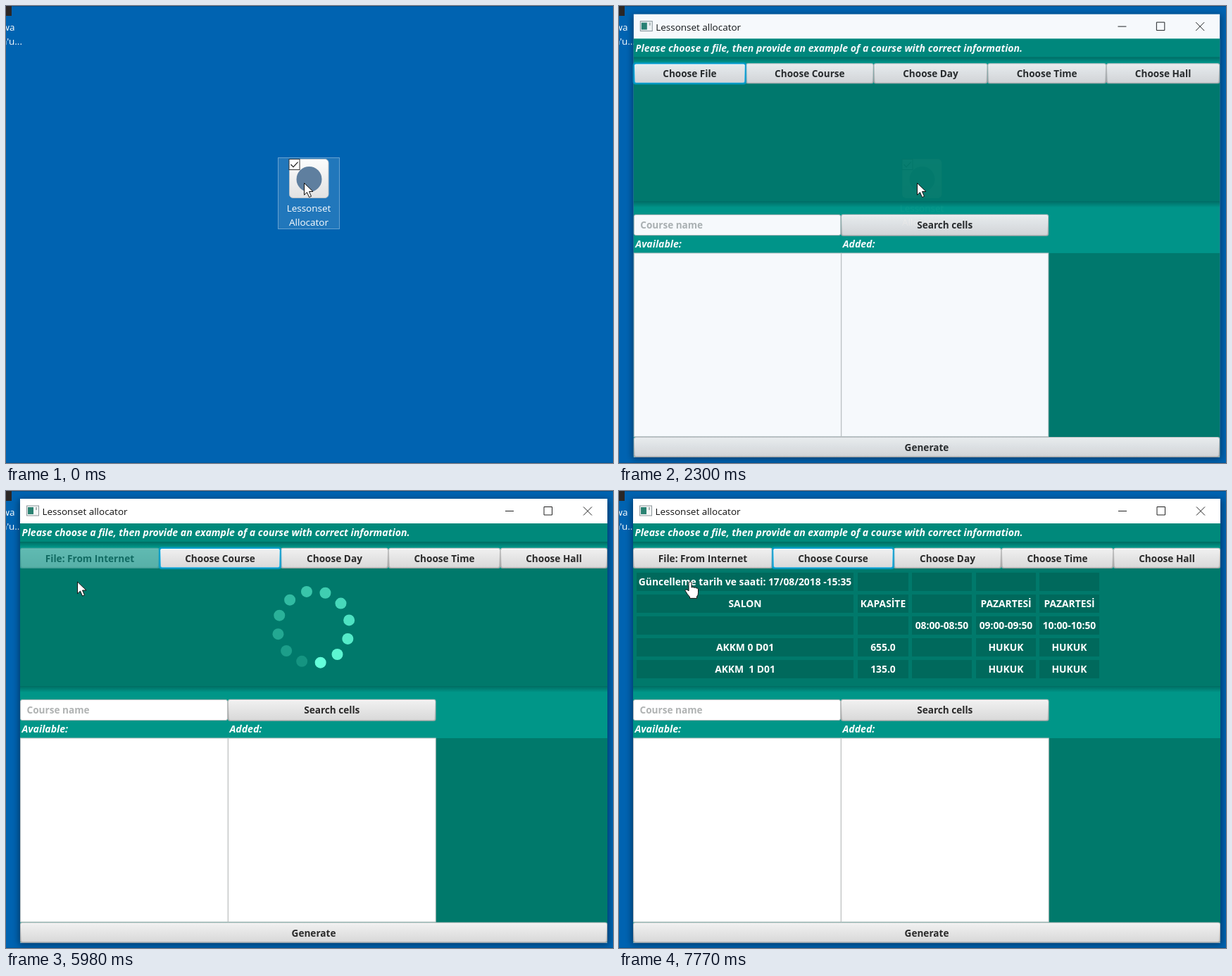
Recreate the animation shown at these times as an HTML page. Size 862 by 649 pixels, loop 8000 ms.

```html
<!DOCTYPE html>
<html lang="en">
<head>
<meta charset="utf-8">
<title>Lessonset allocator</title>
<style>
  html, body { margin: 0; width: 100%; height: 100%; overflow: hidden; background: #0063b1; }
  svg { display: block; width: 100%; height: 100%; }
  text { font: 13.5px "Open Sans", "Noto Sans", sans-serif; white-space: pre; }
  .b { font-weight: 700; font-size: 13.6px; }
  .i { font-style: italic; font-size: 14.1px; }
  .c { font-size: 13.85px; }
  .m { text-anchor: middle; }
</style>
</head>
<body>
<svg id="stage" viewBox="0 0 862 649" xmlns="http://www.w3.org/2000/svg">
  <defs>
    <linearGradient id="face" x2="0" y2="1"><stop stop-color="#f0f0f0"/><stop offset="1" stop-color="#d9d9d9"/></linearGradient>
    <linearGradient id="hover" x2="0" y2="1"><stop stop-color="#fcfcfc"/><stop offset="1" stop-color="#e4e4e4"/></linearGradient>
    <linearGradient id="press" x2="0" y2="1"><stop stop-color="#d4d4d4"/><stop offset="1" stop-color="#bdbdbd"/></linearGradient>
    <linearGradient id="edge" x2="0" y2="1"><stop stop-color="#c6c6c6"/><stop offset="1" stop-color="#a6a6a6"/></linearGradient>
    <linearGradient id="shine" x2="0" y2="1"><stop stop-color="#fff"/><stop offset="1" stop-color="#fff" stop-opacity=".25"/></linearGradient>
    <linearGradient id="tile" x2="0" y2="1"><stop stop-color="#fdfdfd"/><stop offset="1" stop-color="#e2e2e2"/></linearGradient>
    <linearGradient id="shade" x2="0" y2="1"><stop stop-opacity=".28"/><stop offset="1" stop-opacity="0"/></linearGradient>
    <filter id="blur" x="-5%" y="-5%" width="110%" height="110%"><feGaussianBlur stdDeviation="5"/></filter>
  </defs>
</svg>
<script>
const stage = document.getElementById('stage');
const LOOP = 8000;

function add(parent, tag, attrs = {}, label) {
  const el = document.createElementNS(stage.namespaceURI, tag);
  for (const k in attrs) el.setAttribute(k, attrs[k]);
  if (label !== undefined) el.textContent = label;
  parent.appendChild(el);
  return el;
}
const group = (parent, attrs) => add(parent, 'g', attrs);
const rect = (parent, x, y, width, height, fill, more) =>
  add(parent, 'rect', { x, y, width, height, fill, ...more });
const text = (parent, x, y, label, cls, fill) =>
  add(parent, 'text', { x, y, class: cls, fill }, label);
const show = (el, on) => el.setAttribute('display', on ? 'inline' : 'none');

function button(parent, x0, x1, y, h, label, focused) {
  const g = group(parent), w = x1 - x0;
  if (focused) rect(g, x0 - .2, y - .2, w + .4, h + .4, 'none', { rx: 3, stroke: '#039ed3', 'stroke-width': 2.4, opacity: .6 });
  rect(g, x0, y, w, h, focused ? '#039ed3' : 'url(#edge)', { rx: 3 });
  rect(g, x0 + 1.2, y + 1.2, w - 2.4, h - 2.4, 'url(#shine)', { rx: 2.2 });
  const face = rect(g, x0 + 2, y + 2, w - 4, h - 3.6, 'url(#face)', { rx: 1.8 });
  text(g, (x0 + x1) / 2, y + 20.3, label, 'b m', '#2a2a2a');
  return { g, face };
}

function toolbar(parent, edges, first, focus) {
  const g = group(parent);
  const labels = [first, 'Choose Course', 'Choose Day', 'Choose Time', 'Choose Hall'];
  const order = labels.map((_, i) => i).sort((a, b) => (a === focus) - (b === focus));
  const buttons = [];
  for (const i of order)
    buttons[i] = button(g, edges[i], edges[i + 1], 80.7, 29.2, labels[i], i === focus);
  return { g, file: buttons[0] };
}

// Desktop
rect(stage, 0, 0, 862, 649, '#0063b1');
rect(stage, 0, 0, 862, 1, '#004f8d');
rect(stage, 0, 648, 862, 1, '#00579c');
rect(stage, 0, 0, 8, 14, '#2b2726');
add(stage, 'text', { x: 12.5, y: 35, fill: '#fff', 'text-anchor': 'end' }, 'wa');
add(stage, 'text', { x: 23, y: 55, fill: '#fff', 'text-anchor': 'end' }, "a'u...");

const shortcut = group(stage);
const selection = rect(shortcut, 386.5, 215.5, 87, 101, '#fff', { 'fill-opacity': .13, stroke: '#fff', 'stroke-opacity': .36 });
rect(shortcut, 402.5, 217.5, 55.5, 55, 'url(#tile)', { rx: 5, stroke: '#b9bfc5' });
add(shortcut, 'circle', { cx: 430.5, cy: 246, r: 18, fill: '#5f7f9f' });
rect(shortcut, 402, 217.5, 15, 15, '#fff', { stroke: '#333' });
add(shortcut, 'path', { d: 'M404.5 225l3.5 3.6 6.5-7', fill: 'none', stroke: '#222', 'stroke-width': 1.3 });
text(shortcut, 430, 292, 'Lessonset', 'm', '#fff');
text(shortcut, 430, 312, 'Allocator', 'm', '#fff');

// Window frame
const win = group(stage);
rect(win, 18, 12, 838, 632, '#000', { opacity: .4, filter: 'url(#blur)' });
rect(win, 20, 11, 834, 630.5, '#fff');
rect(win, 29.5, 21, 17, 14, '#f4f6f6', { stroke: '#8b9599' });
rect(win, 31, 23, 8, 10, '#2b8272');
rect(win, 42, 23, 2, 4, '#a9b5b5');
text(win, 51.5, 34, 'Lessonset allocator', '', '#111');
add(win, 'path', { d: 'M709 28.5h12M764 22.5h11.5v11.5h-11.5zM820 22.5l12 12m0-12l-12 12', fill: 'none', stroke: '#222' });

// Window content
const body = group(win);
rect(body, 20, 46, 834, 595, '#009688');
rect(body, 20, 46, 834, 26, '#00897b');
rect(body, 20, 72, 834, 8, 'url(#shade)');
text(body, 22.5, 64, 'Please choose a file, then provide an example of a course with correct information.', 'b i', '#fff');
rect(body, 20, 110, 834, 167, '#00796b');
rect(body, 20, 277, 834, 9, 'url(#shade)');
const before = toolbar(body, [20, 179.5, 361.5, 523.5, 692.5, 854], 'Choose File', 0);
const after = toolbar(body, [20, 218, 390, 543, 702, 854], 'File: From Internet', 1);

rect(body, 20.5, 296.5, 294, 29, '#fff', { rx: 2.5, stroke: '#b8bcbc' });
text(body, 29.5, 316, 'Course name', 'b', '#b0b3b3');
button(body, 315, 610.5, 295.8, 31, 'Search cells');
text(body, 22.5, 343, 'Available:', 'b i', '#fff');
text(body, 317.5, 343, 'Added:', 'b i', '#fff');
rect(body, 610, 351, 244, 262, '#00796b');
for (const x of [20.5, 315.5]) rect(body, x, 351, 294.7, 261, '#fff', { stroke: '#bfc2c2' });
button(body, 20, 854, 612.6, 29, 'Generate');

// Progress ring
const spinner = group(body);
const dots = Array.from({ length: 12 }, (_, i) =>
  add(spinner, 'circle', { r: 8, fill: '#64ffda', opacity: 1 - i * .072 }));

// Timetable
const table = group(body);
const cols = [[25, 308], [339, 72], [416, 85], [507, 85], [597, 85]];
const rows = [
  ['Güncelleme tarih ve saati: 17/08/2018 -15:35'],
  ['SALON', 'KAPASİTE', '', 'PAZARTESİ', 'PAZARTESİ'],
  ['', '', '08:00-08:50', '09:00-09:50', '10:00-10:50'],
  ['AKKM 0 D01', '655.0', '', 'HUKUK', 'HUKUK'],
  ['AKKM  1 D01', '135.0', '', 'HUKUK', 'HUKUK']
];
rows.forEach((row, r) => cols.forEach(([x, w], c) => {
  const y = 116 + r * 31;
  rect(table, x, y, w, 26, '#00695c');
  if (row[c]) text(table, x + w / 2, y + 18, row[c], 'b c m', '#fff');
}));

// Pointer: arrow, hand and busy rings
const pointer = group(stage);
const outline = { fill: '#fff', stroke: '#111', 'stroke-linejoin': 'round' };
const arrow = add(pointer, 'path', { ...outline, d: 'M.5 .5V17.3l4-3.7 3 7 3-1.3-3-6.8H13z' });
const hand = add(pointer, 'path', { ...outline,
  d: 'M-2 1.5q2-2.8 4 0v7q2-1.5 3.5.3 2-1 3.3.6 2.5-.6 2.7 2v5q0 3-2 5v2.5h-10v-2q-4-4-6.5-9 1-3 5 .5z' });
function ring(x, y, r, w) {
  const g = group(pointer);
  add(g, 'circle', { cx: x, cy: y, r, fill: 'none', stroke: '#2a8ad6', 'stroke-width': w });
  add(g, 'circle', { cx: x, cy: y, r, fill: 'none', stroke: '#9fd8fa', 'stroke-width': w * .6, 'stroke-dasharray': `${r * 2} ${r * 5}` });
  return g;
}
const busy = ring(0, -.5, 11.5, 5);
const working = ring(17.5, -.5, 7.5, 4);

// Opening steps: time, scale, opacity
const opening = [[2060, .957, .28], [2140, .979, .59], [2230, .993, .86], [2300, .998, .965], [2380, 1, 1]];

// Pointer moves: start, end, steps, from, to
const moves = [
  [3310, 3540, 4, [423, 251], [196, 107]],
  [3800, 4020, 4, [196, 107], [108.5, 97]],
  [4970, 5120, 3, [108.5, 97], [101, 128.5]]
];

// Share of a stepped change that has been reached at time t
function stepped(t, start, end, count) {
  if (t < start) return 0;
  const k = Math.floor((t - start) / (end - start) * (count - 1) + 1e-6) + 1;
  return Math.min(k, count) / count;
}

function pointerAt(t) {
  let pos = moves[0][3];
  for (const [start, end, count, a, b] of moves) {
    if (t < start) break;
    const p = stepped(t, start, end, count);
    const e = p * (2 - p);
    pos = [a[0] + (b[0] - a[0]) * e, a[1] + (b[1] - a[1]) * e];
  }
  return pos;
}

function drawSpinner(t) {
  const tick = 78.6;
  const s = 5745 + Math.max(0, Math.floor((t - 5740) / tick)) * tick;
  // The ring drifts back while the bright dot jumps ahead every 100 ms.
  const head = 79 + 30 * Math.floor((s - 5970) / 100) - (s - 5980) * .36 / 3.9;
  dots.forEach((dot, i) => {
    const a = (head - 30 * i) * Math.PI / 180;
    dot.setAttribute('cx', 436.8 + 51.3 * Math.cos(a));
    dot.setAttribute('cy', 193.3 + 51.3 * Math.sin(a));
  });
}

function draw(t) {
  const open = opening.filter(o => t >= o[0]).pop();
  show(win, open);
  if (open) {
    const [, k, alpha] = open;
    win.setAttribute('transform', `translate(${437 * (1 - k)} ${326 * (1 - k)}) scale(${k})`);
    win.setAttribute('opacity', alpha);
  }
  show(selection, t < 2060);
  show(body, t >= 2230);

  const [x, y] = pointerAt(t);
  const chosen = t >= 5750, loaded = t >= 7470;
  show(before.g, !chosen);
  show(after.g, chosen);
  after.file.g.setAttribute('opacity', loaded ? 1 : .4);
  const over = x < 179 && y < 110;
  const state = t >= 4340 && t < 4500 ? 'press' : over ? 'hover' : 'face';
  before.file.face.setAttribute('fill', `url(#${state})`);

  show(spinner, chosen && !loaded);
  if (chosen && !loaded) drawSpinner(t);
  table.setAttribute('opacity', stepped(t, 7470, 7770, 5));

  pointer.setAttribute('transform', `translate(${x} ${y})`);
  show(arrow, !loaded);
  show(hand, loaded);
  show(busy, t >= 910 && t < 1220);
  show(working, t >= 1220 && t < 1510);
}

const began = performance.now();
function frame() {
  draw((performance.now() - began) % LOOP);
  requestAnimationFrame(frame);
}
draw(0);
requestAnimationFrame(frame);
</script>
</body>
</html>
```
